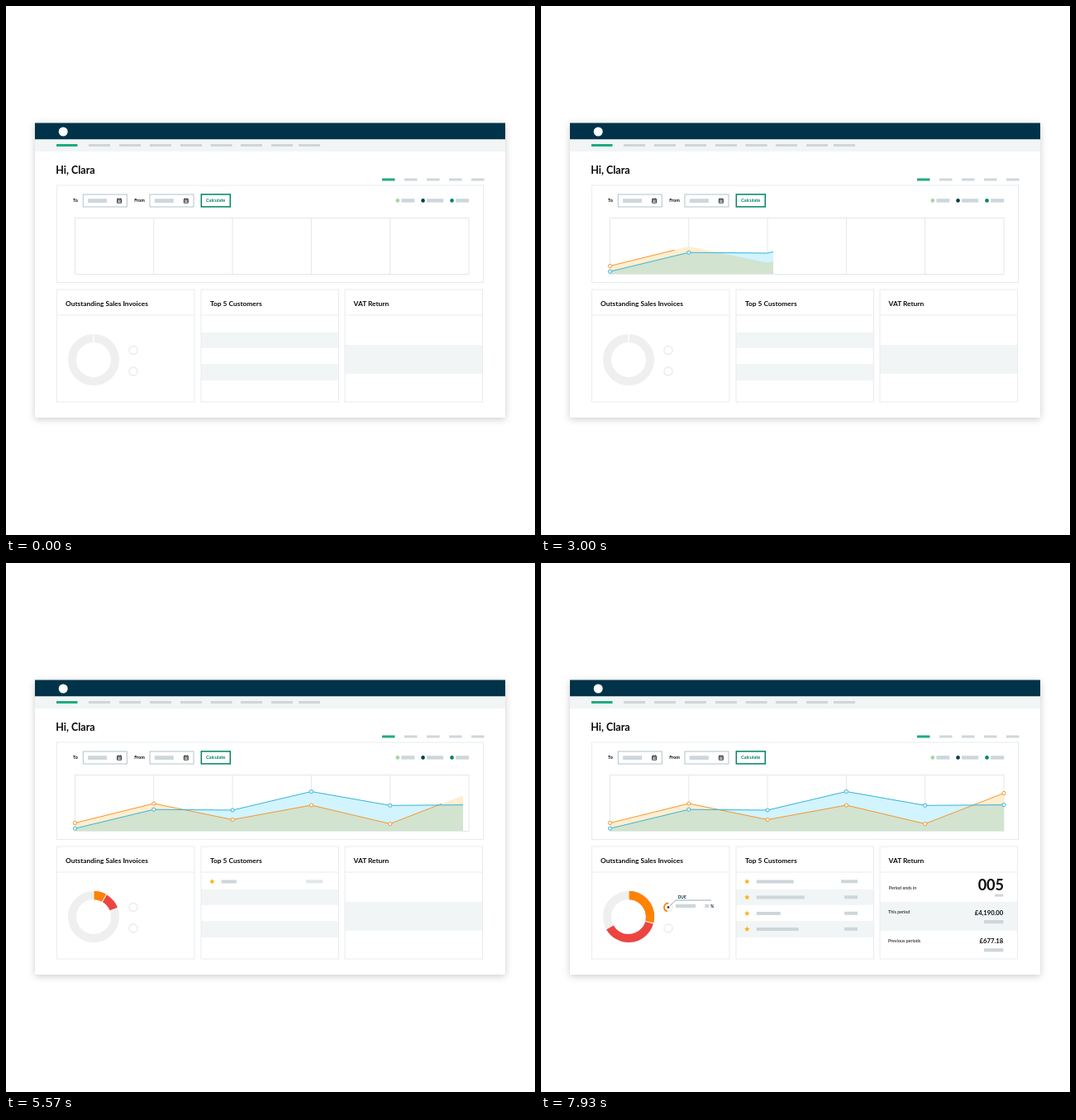
Write an HTML page that moves like this. It is 640x640 px and loops after 8 s.

```html
<!DOCTYPE html>
<html lang="en">
<head>
<meta charset="utf-8">
<title>Dashboard</title>
<style>
  html, body { margin: 0; height: 100%; overflow: hidden; background: #fff; }
  svg { display: block; width: 100vw; height: 100vh; font-family: Lato, sans-serif; }
  .window { fill: #fff; filter: drop-shadow(0 2px 4px rgba(0, 0, 0, .2)); }
  .navy { fill: #003349; }
  .pale { fill: #f1f5f6; }
  .grey { fill: #cdd6db; }
  .green { fill: #1fab82; }
  .frame { fill: none; stroke: #e8ecee; }
  .grid { fill: none; stroke: #e3e7e9; }
  .input { fill: #fff; stroke: #b3c3c9; }
  .button { fill: #fff; stroke: #00855f; stroke-width: 1.5; }
  .icon { fill: none; stroke: #222; stroke-width: .9; }
  .area { mix-blend-mode: multiply; }
  .line { fill: none; stroke-width: 1; }
  .marker { fill: #fff; stroke-width: 1; }
  .ring { fill: none; stroke: #efefef; }
  .bold { font-weight: 700; }
  .end { text-anchor: end; }
</style>
</head>
<body>
<svg id="stage" viewBox="0 0 640 640"></svg>
<script>
const LOOP = 8000;
const CHART = { left: 83.5, right: 560, top: 256.5, bottom: 324.5, step: 95.3 };
const ORANGE = '#f7952f', BLUE = '#35b4d8';

const series = {
  orange: { color: ORANGE, fill: '#ffeed0', ys: [314.5, 291, 310.5, 293, 315.5, 278.5],
            pops: [2010, 3235, 3680, 4090, 4700, 7100] },
  blue: { color: BLUE, fill: '#d2f4ff', ys: [321.2, 298.2, 299, 276.5, 293.3, 292.6],
          pops: [1160, 2450, 2890, 3290, 3760, 6130] }
};
const customers = [
  { y: 385.5, bar: 45, side: 20, start: 5250 },
  { y: 404.5, bar: 58, side: 16, start: 5850 },
  { y: 424, bar: 29, side: 16, start: 6500 },
  { y: 443, bar: 51, side: 16, start: 7180 }
];

// Markup helpers
const rect = (cls, x, y, w, h, id = '') =>
  `<rect ${id && `id="${id}"`} class="${cls}" x="${x}" y="${y}" width="${w}" height="${h}"/>`;
const text = (str, x, y, size, cls = 'bold', fill = '#0b0b0b') =>
  `<text class="${cls}" x="${x}" y="${y}" font-size="${size}" fill="${fill}">${str}</text>`;
const dot = (x, y, r, fill) => `<circle cx="${x}" cy="${y}" r="${r}" fill="${fill}"/>`;
const arc = (id, cx, cy, r, width, color, flip = 1) =>
  `<circle id="${id}" r="${r}" fill="none" stroke="${color}" stroke-width="${width}" pathLength="360"
    stroke-dasharray="0 360" transform="translate(${cx} ${cy}) scale(${flip} 1) rotate(-90)"/>`;
const group = (id, body) => `<g id="${id}">${body}</g>`;

const px = i => CHART.left + i * CHART.step;
const points = ys => ys.map((y, i) => `${px(i)},${y}`).join(' ');
const area = s => `<polygon class="area" fill="${s.fill}" points="${points(s.ys)} ${CHART.right},${CHART.bottom} ${CHART.left},${CHART.bottom}"/>`;
const line = s => `<polyline class="line" stroke="${s.color}" points="${points(s.ys)}"/>`;
const markers = name => series[name].ys.map((y, i) =>
  `<circle id="${name}${i}" class="marker" stroke="${series[name].color}" r="2.1" transform="translate(${px(i)} ${y})"/>`).join('');

function starPoints(r) {
  return Array.from({ length: 10 }, (_, i) => {
    const a = i * Math.PI / 5, d = i % 2 ? r * .45 : r;
    return `${(d * Math.sin(a)).toFixed(2)},${(-d * Math.cos(a)).toFixed(2)}`;
  }).join(' ');
}

const calendar = x => `<path class="icon" d="M${x - 2.5} 233.6h5v4.6h-5zM${x - 2.5} 235h5M${x - 1.3} 232.4v1.2M${x + 1.3} 232.4v1.2"/>
  <path class="icon" stroke-dasharray=".8 .7" d="M${x - 1.8} 236.6h3.8"/>`;
const dateField = (label, x, fieldX) => text(label, x, 237.4, 5.5) +
  rect('input', fieldX, 228, 53, 15) + rect('grey', fieldX + 5.8, 233.2, 23, 4.8) + calendar(fieldX + 43.8);
const card = (title, x, tx) => rect('frame', x, 343, 166.5, 136) +
  `<path class="frame" d="M${x} 374h166.5"/>` + text(title, tx, 362.6, 8.4);

function shell() {
  const nav = [100, 137, 174, 211, 247.5, 284, 321, 354];
  const tabs = [482, 509, 536, 563];
  return rect('window', 35, 141.5, 569, 356.5) +
    rect('navy', 35, 141.5, 569, 20) + dot(69.2, 152, 5.5, '#fff') +
    rect('pale', 35, 161.5, 569, 14.5) + rect('green', 61, 167, 25.5, 3) +
    nav.map(x => rect('grey', x, 167, 26, 3)).join('') +
    text('Hi, Clara', 60.3, 203, 12.5) +
    rect('green', 455, 208.5, 15.5, 3) +
    tabs.map(x => rect('grey', x, 208.5, 15.5, 3)).join('');
}

function chart() {
  const { left, right, top, bottom } = CHART;
  const legend = [[473.8, '#a3d69e', 16], [504.5, '#003f45', 20], [539.5, '#00855f', 16]];
  return rect('frame', 61.5, 217, 516, 117.5) +
    dateField('To', 81, 93.3) + dateField('From', 155.2, 174) +
    rect('button', 236.3, 227.9, 35, 15) + text('Calculate', 242, 237.4, 5.7, 'bold', '#00855f') +
    legend.map(([x, c, w]) => dot(x, 235.4, 2.3, c) + rect('grey', x + 4.6, 233.2, w, 4.4)).join('') +
    rect('grid', left, top, right - left, bottom - top) +
    [1, 2, 3, 4].map(i => `<path class="grid" d="M${px(i)} ${top}V${bottom}"/>`).join('') +
    `<clipPath id="fillClip">${rect('', left - .5, 250, 0, 80, 'fillEdge')}</clipPath>
     <clipPath id="lineClip">${rect('', left - .5, 250, 0, 80, 'lineEdge')}</clipPath>
     <g clip-path="url(#fillClip)">${area(series.orange)}${area(series.blue)}</g>
     <g clip-path="url(#lineClip)">${line(series.orange)}</g>
     <g clip-path="url(#fillClip)">${line(series.blue)}</g>` +
    markers('orange') + markers('blue');
}

function invoices() {
  return card('Outstanding Sales Invoices', 61.5, 72) +
    '<circle class="ring" cx="106" cy="428" r="26" stroke-width="10"/>' +
    arc('red', 106, 428, 26, 10, '#ec4540') + arc('orange', 106, 428, 26, 10, '#ff8200') +
    '<path stroke="#fff" d="M106 396v12"/><path id="split" stroke="#fff" d="M0-32V-20"/>' +
    [416.5, 442].map(y => `<circle class="ring" cx="154" cy="${y}" r="5" stroke-width="1.8"/>`).join('') +
    arc('due', 154, 416.5, 5, 1.8, '#ff8200', -1) +
    group('dueLabel', dot(154, 416.5, 1.2, '#111') +
      text('DUE', 165.7, 405.6, 4.8, 'bold', '#003349') +
      rect('grey', 198.3, 412.8, 4.8, 4.2) + text('%', 205, 416.8, 5.2)) +
    '<path id="leader" fill="none" stroke="#5d6f86" stroke-width=".6" d="M154 416.5L163 408H206"/>' +
    rect('grey', 163, 412.8, 0, 4.2, 'dueBar');
}

function topCustomers() {
  return rect('pale', 236, 394.8, 166.5, 19) + rect('pale', 236, 433.2, 166.5, 19.8) +
    card('Top 5 Customers', 236, 247) +
    customers.map((c, i) =>
      `<polygon id="star${i}" fill="#fcb017" points="${starPoints(3.4)}"/>` +
      rect('grey', 260.7, c.y - 2, 0, 4, 'name' + i) +
      rect('grey', 383 - c.side, c.y - 2.2, c.side, 4, 'side' + i)).join('');
}

function vat() {
  return rect('pale', 410, 410, 166, 35) + card('VAT Return', 410, 420.6) +
    group('vat0', text('Period ends in', 420.8, 394.6, 5.4, '') + rect('grey', 549, 400.6, 10.3, 3)) +
    '<text id="days" class="bold end" x="560" y="396" font-size="18" fill="#0b0b0b"></text>' +
    group('vat1', text('This period', 420, 424, 5.4, '') +
      text('£4,190.00', 559.2, 426, 7.6, 'bold end') + rect('grey', 536, 432, 23.3, 4.2)) +
    group('vat2', text('Previous periods', 420, 459.4, 5.4, '') +
      text('£677.18', 559.2, 460, 7.7, 'bold end') + rect('grey', 536, 466.2, 23.3, 4.2));
}

document.getElementById('stage').innerHTML = shell() + chart() + invoices() + topCustomers() + vat();

// Timing helpers
const progress = (t, start, length) => Math.min(1, Math.max(0, (t - start) / length));
const smooth = u => u * u * (3 - 2 * u);
const ease = (t, start, length) => smooth(progress(t, start, length));

// Symmetric cubic-bezier(a, 0, 1 - a, 1)
function sweep(u, a = .66) {
  let lo = 0, hi = 1;
  for (let i = 0; i < 24; i++) {
    const s = (lo + hi) / 2, r = 1 - s;
    if (3 * a * s * r * r + 3 * (1 - a) * s * s * r + s ** 3 < u) lo = s; else hi = s;
  }
  return smooth(lo);
}

const set = (id, attrs) => {
  const el = document.getElementById(id);
  for (const key in attrs) el.setAttribute(key, attrs[key]);
};
const scaleAt = (x, y, k) => ({ transform: `translate(${x} ${y}) scale(${k})`, visibility: k ? 'visible' : 'hidden' });
const dash = (length, total) => ({
  'stroke-dasharray': `${length} ${total}`,
  visibility: length > 0 ? 'visible' : 'hidden'
});

function render(t) {
  const width = CHART.right - CHART.left;
  const reveal = start => {
    const k = sweep(progress(t, start, 6400));
    return { width: k * width + (k ? .5 : 0) };
  };
  set('fillEdge', reveal(-10));
  set('lineEdge', reveal(775));
  for (const [name, s] of Object.entries(series))
    s.ys.forEach((y, i) => set(name + i, scaleAt(px(i), y, ease(t, s.pops[i], 400))));

  const turn = ease(t, 4900, 1900);
  set('red', dash(240 * turn, 360));
  set('orange', dash(105 * turn, 360));
  set('split', { transform: `translate(106 428) rotate(${105 * turn})` });

  set('dueLabel', { opacity: ease(t, 5900, 400) });
  set('due', dash(165 * ease(t, 5900, 1700), 360));
  set('leader', dash(55.4 * ease(t, 5800, 1450), 100));
  set('dueBar', { width: 24 * ease(t, 6080, 1200) });

  customers.forEach((c, i) => {
    set('star' + i, scaleAt(249.3, c.y, ease(t, c.start, 300)));
    set('name' + i, { width: c.bar * ease(t, c.start + 60, 600) });
    set('side' + i, { opacity: ease(t, c.start + 100, 400) });
  });

  set('vat0', { opacity: ease(t, 5550, 350) });
  set('vat1', { opacity: ease(t, 5900, 400) });
  set('vat2', { opacity: ease(t, 6600, 400) });
  const shown = [5600, 6000, 6700].filter(start => t >= start).length;
  document.getElementById('days').textContent = '005'.slice(0, shown);
}

function tick() {
  render(performance.now() % LOOP);
  requestAnimationFrame(tick);
}
tick();
</script>
</body>
</html>
```
